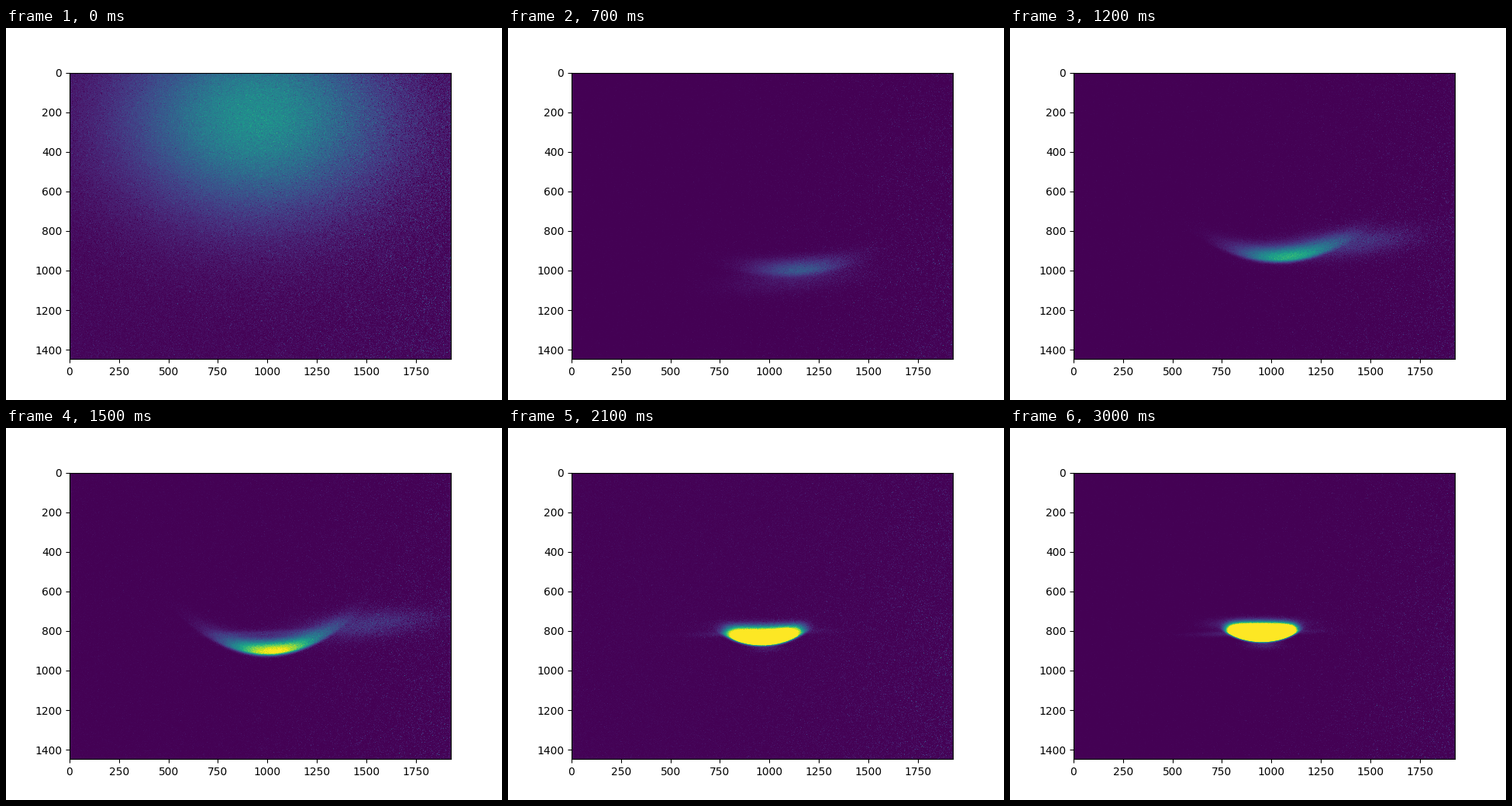
Recreate the animation shown at these times as a matplotlib script. Size 640x480 px, loop 3.1 s.

```python
import numpy as np
import matplotlib.pyplot as plt
from matplotlib.animation import FuncAnimation

W, H = 1928, 1448          # sensor size in data units
COLS, ROWS = 492, 370      # sampled grid
FRAMES, INTERVAL = 31, 100

x = ((np.arange(COLS) + 0.5) * W / COLS)[None, :]
y = ((np.arange(ROWS) + 0.5) * H / ROWS)[:, None]


def ramp(n, start, end):
    return np.clip((n - start) / (end - start), 0, 1)


def smooth(n, start, end):
    p = ramp(n, start, end)
    return p * p * (3 - 2 * p)


def ease_out(n, start, end):
    return np.sin(np.pi / 2 * ramp(n, start, end))


def bump(n, start, end):
    return np.sin(np.pi * ramp(n, start, end))


def spot(amp, cx, cy, sx, sy, slope=0):
    dx = x - cx
    return amp * np.exp(-0.5 * ((dx / sx) ** 2 + ((y - cy - slope * dx) / sy) ** 2))


def crescent(amp, cx, low, rise, flat):
    """Curved ridge whose upper edge straightens as flat goes to 1."""
    dx = x - cx
    tilt = -0.07 * (1 - flat) * dx
    bend = (4 + 10 * rise) * (dx / 100) ** 2
    bottom = low + tilt - bend
    top = low - 8 - 40 * flat + tilt - bend * (1 - flat)
    over = np.maximum(top - y, 0) / (36 - 16 * flat)
    under = np.maximum(y - bottom, 0) / (18 - 11 * np.sqrt(rise))
    across = np.abs(dx / (158 - 10 * rise)) ** (2 + 4 * flat)
    return amp * np.exp(-0.5 * (across + over ** 2 + under ** 2))


def picture(n):
    fall = ease_out(n, 0, 7)      # the wide cloud sinks and collapses
    rise = ease_out(n, 7, 27)     # the crescent climbs and brightens
    flat = smooth(n, 16, 25)      # its top levels off
    left = 1 - fall
    cx = 950 + 200 * smooth(n, 2, 7) - 200 * rise
    low = 230 + 773 * fall - 157 * rise

    light = spot(0.47 * left ** 2.4, 950, low, 450, 325 * left ** 1.5 + 5, -0.06 * fall)
    light += crescent(0.22 * smooth(n, 3, 7) * 13.6 ** rise, cx, low, rise, flat)
    light += spot(0.16 * bump(n, 5, 20), 1150 + 600 * rise, low + 35 - 300 * rise,
                  220, 45, -0.1)                                    # trailing tail
    light += spot(0.28 * flat, cx - 15, low - 78, 125, 19)          # rim above
    light += spot(0.14 * smooth(n, 12, 18), cx - 25, 811, 170, 9, -0.03)  # side wings
    light += spot(0.09 * flat, cx + 10, low + 26, 55, 14)           # glow below

    rng = np.random.default_rng(n)
    normal = rng.standard_normal((ROWS, COLS))
    spiky = normal * np.abs(rng.standard_normal((ROWS, COLS)))
    edge = (x / W) ** 3
    haze = bump(n, 12, 30)
    grain = 0.004 + 0.016 * left + 0.005 * haze + 0.05 * edge * (0.5 + 0.5 * y / H)
    noise = grain * spiky + (0.025 + 0.03 * edge) * np.sqrt(np.minimum(light, 1)) * normal
    return np.clip(light + 0.018 * left + 0.008 * haze + noise, 0, 1)


fig, ax = plt.subplots(figsize=(6.4, 4.8), dpi=100)
image = ax.imshow(picture(0), cmap="viridis", vmin=0, vmax=1,
                  interpolation="nearest", extent=(0, W, H - 0.5, -0.5))


def update(n):
    image.set_data(picture(n))
    return [image]


anim = FuncAnimation(fig, update, frames=FRAMES, interval=INTERVAL,
                     repeat=True, repeat_delay=0)
plt.show()
```
